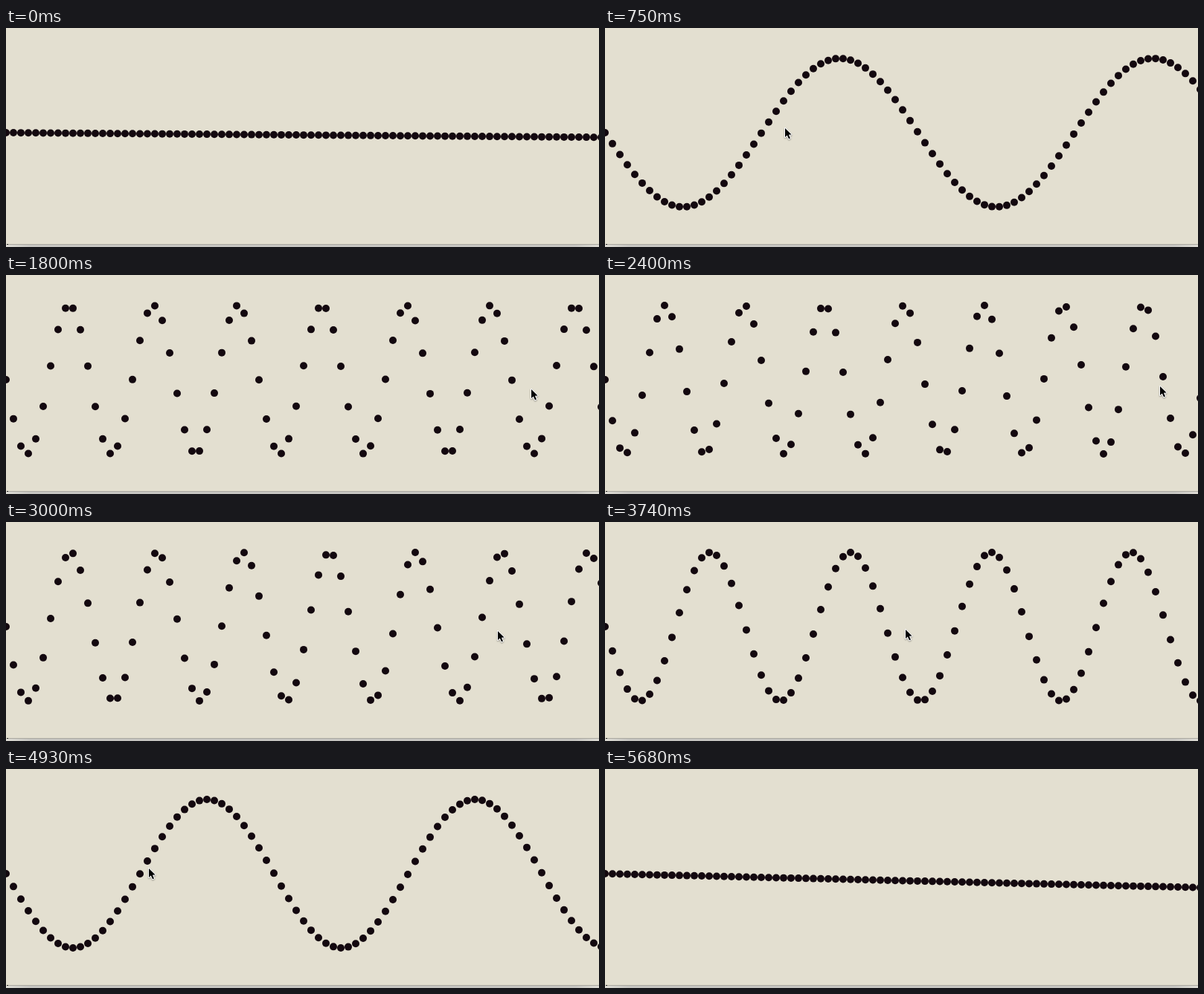
An HTML page with a canvas for the animation above (8.04 s loop, 797 by 295 pixels).

```html
<!DOCTYPE html>
<html lang="en">
<head>
<meta charset="utf-8">
<title>Sine dots</title>
<style>
  html, body { margin: 0; width: 100%; height: 100%; overflow: hidden; background: #e3dfd0; }
  canvas { display: block; }
</style>
</head>
<body>
<canvas id="stage" width="797" height="295"></canvas>
<script>
const ctx = document.getElementById("stage").getContext("2d");
const W = 797, H = 295, LOOP = 8040;
const STEP = 150, RESYNC = 3730; // the stepping clock restarts once
const LAG = 100;                 // the wave trails the arrow by this many ms
const BASE = 141, AMP = 100, GAP = 10, RADIUS = 5;

// Pointer path: sweep right, rest, turn, sweep back, rest, leave
const keys = [
  { t: 150, x: 1, y: 132 },
  { t: 1200, x: 419, y: 140 },
  { t: 1800, x: 706, y: 154 },
  { t: 1950, x: 706, y: 154 },
  { t: 2400, x: 746, y: 150 },
  { t: 2550, x: 746, y: 150 },
  { t: 3000, x: 690, y: 147 },
  { t: RESYNC, x: 424, y: 145 },
  { t: 4030, x: 388, y: 143 },
  { t: 4180, x: 388, y: 143 },
  { t: 4930, x: 222, y: 134 },
  { t: 5680, x: 3, y: 131 }
];

const arrow = [[0, 0], [0, 12], [2.8, 9.4], [5, 14.3], [7, 13.4], [4.9, 8.7], [8.6, 8.6]];

// Slope of the segment that ends at key i
function slope(i, axis) {
  const a = keys[i - 1], b = keys[i];
  return a && b ? (b[axis] - a[axis]) / (b.t - a.t) : 0;
}

// Mean slope at a key, flat at turns and rests
function tangent(i, axis) {
  const before = slope(i, axis), after = slope(i + 1, axis);
  return before * after > 0 ? (before + after) / 2 : 0;
}

// Smooth cubic path through the keys
function path(t, axis) {
  const i = keys.findIndex(k => k.t >= t);
  if (i < 0) return keys[keys.length - 1][axis];
  if (i === 0) return keys[0][axis];
  const a = keys[i - 1], b = keys[i], span = b.t - a.t;
  const s = (t - a.t) / span, ease = s * s * (3 - 2 * s);
  return a[axis] + (b[axis] - a[axis]) * ease
    + span * s * (1 - s) * ((1 - s) * tangent(i - 1, axis) - s * tangent(i, axis));
}

function tickAt(t) {
  const start = t < RESYNC + 10 ? 0 : RESYNC;
  const tick = start + Math.floor((t - start) / STEP) * STEP;
  return start ? tick : Math.min(tick, RESYNC - 130);
}

function drawEdge() {
  const shade = ctx.createLinearGradient(0, 0, W, 0);
  shade.addColorStop(0, "#dedcd5");
  shade.addColorStop(0.04, "#c6c5c1");
  shade.addColorStop(0.96, "#c6c5c1");
  shade.addColorStop(1, "#dedcd5");
  ctx.fillStyle = shade;
  ctx.fillRect(0, 292, W, 3);
  ctx.fillStyle = "#aaa8a0";
  ctx.fillRect(3, 291, W - 3, 1);
  ctx.fillStyle = "#222";
  ctx.fillRect(1, 291, 2, 1);
}

function drawDots(input) {
  const k = input * Math.PI / 4000;
  ctx.fillStyle = "#13080f";
  for (let i = 0; i * GAP <= W + RADIUS; i++) {
    ctx.beginPath();
    ctx.arc(i * GAP, BASE + AMP * Math.sin(i * k), RADIUS, 0, Math.PI * 2);
    ctx.fill();
  }
}

function drawArrow(x, y) {
  ctx.save();
  ctx.translate(Math.round(x), Math.round(y));
  ctx.beginPath();
  arrow.forEach(p => ctx.lineTo(...p));
  ctx.closePath();
  ctx.lineJoin = "round";
  ctx.lineWidth = 2;
  ctx.strokeStyle = "#fff";
  ctx.shadowColor = "rgba(0,0,0,0.35)";
  ctx.shadowBlur = 2;
  ctx.shadowOffsetY = 1;
  ctx.stroke();
  ctx.shadowColor = "transparent";
  ctx.fillStyle = "#000";
  ctx.fill();
  ctx.restore();
}

function frame() {
  const tick = tickAt(performance.now() % LOOP);
  const input = path(tick, "x");
  // A resting pointer has no lead over the wave
  const resting = path(tick + STEP, "x") === input;

  ctx.fillStyle = "#e3dfd0";
  ctx.fillRect(0, 0, W, H);
  drawEdge();
  drawDots(input);
  if (input > 5) drawArrow(resting ? input : path(tick + LAG, "x"), path(tick, "y"));
  requestAnimationFrame(frame);
}
frame();
</script>
</body>
</html>
```
